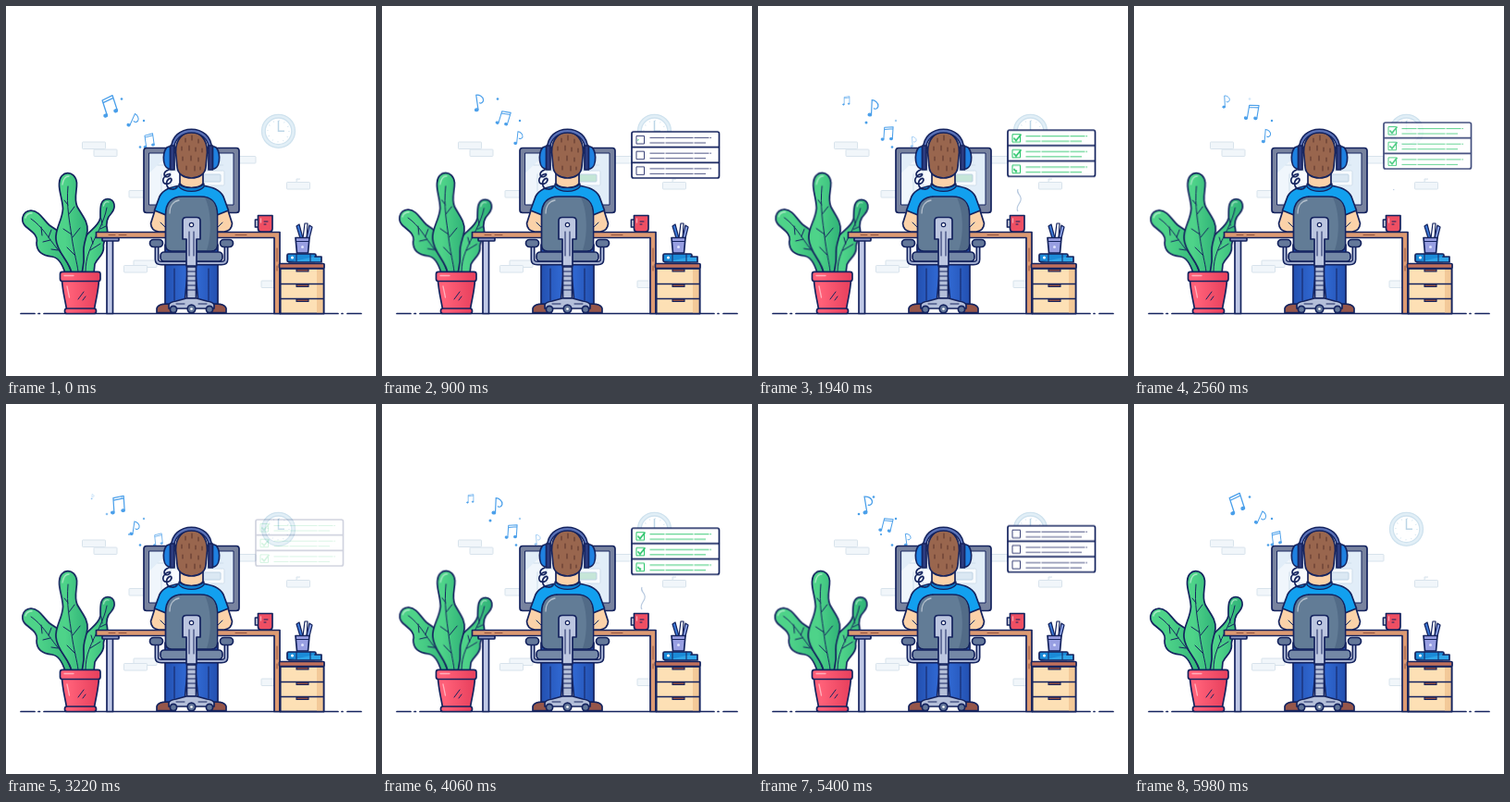
These frames come from a looping animation (400x400 px, 6 s). An HTML page:

```html
<!DOCTYPE html>
<html lang="en">
<head>
<meta charset="utf-8">
<title>Working at the desk</title>
<style>
  html, body { margin: 0; width: 100%; height: 100%; overflow: hidden; background: #fff; }
  svg { display: block; width: 100vw; height: 100vh; }
  .ink { stroke: #14235e; stroke-width: 1.7; stroke-linejoin: round; stroke-linecap: round; }
  .thin { stroke-width: 1; }
  .line { fill: none; }
  .faint { fill: #f1f6fa; stroke: #d8e3ec; stroke-width: 1; }
  .shine { fill: none; stroke: #fff; stroke-opacity: .5; stroke-width: 1.3; stroke-linecap: round; }

  /* the scene runs forward for 3 s, then backward */
  #plant { transform-origin: 80px 288px; animation: sway 1.5s ease-in-out infinite alternate; }
  @keyframes sway { to { transform: rotate(1.7deg); } }

  #panel { animation: drift 3s infinite alternate, show 3s linear infinite alternate; }
  @keyframes drift {
    0% { transform: translateY(127px); animation-timing-function: ease-in-out; }
    45% { transform: translateY(138.6px); animation-timing-function: ease-in-out; }
    95%, 100% { transform: translateY(125px); }
  }
  @keyframes show {
    0%, 4% { opacity: 0; }
    17%, 83% { opacity: 1; }
    95%, 100% { opacity: 0; }
  }

  #steam { stroke-dasharray: 1 2; animation: steam 3s linear infinite alternate; }
  @keyframes steam {
    0%, 44% { stroke-dashoffset: 1; }
    58%, 70% { stroke-dashoffset: 0; }
    86%, 100% { stroke-dashoffset: -1; }
  }

  #button { fill: #dbe8f3; animation: press 3s linear infinite alternate; }
  @keyframes press {
    0%, 23%, 37%, 56%, 72%, 100% { fill: #dbe8f3; }
    30%, 47%, 64% { fill: #c4e6d6; }
  }
</style>
</head>
<body>
<svg viewBox="0 0 400 400">
  <defs>
    <linearGradient id="leaf">
      <stop offset=".3" stop-color="#4ed389"/><stop offset="1" stop-color="#2fb277"/>
    </linearGradient>
    <linearGradient id="clay">
      <stop offset=".2" stop-color="#ff6078"/><stop offset="1" stop-color="#e73f5c"/>
    </linearGradient>
    <linearGradient id="denim">
      <stop offset="0" stop-color="#2350b0"/><stop offset=".35" stop-color="#2f66cf"/>
      <stop offset=".65" stop-color="#2f66cf"/><stop offset="1" stop-color="#2350b0"/>
    </linearGradient>
    <g id="brick"><rect class="faint" width="25" height="7.500" rx=".8"/></g>
    <g id="pair" fill="#4a9fea" stroke="#4a9fea" stroke-width="1.200" stroke-linejoin="round">
      <path class="line" d="M-4 7V-8L7 -9.500V5.500M-4 -5.500L7 -7"/>
      <ellipse cx="-5.500" cy="7.300" rx="1.700" ry="1.300"/>
      <ellipse cx="5.500" cy="5.800" rx="1.700" ry="1.300"/>
    </g>
    <g id="single" fill="#4a9fea" stroke="#4a9fea" stroke-width="1.200" stroke-linecap="round">
      <path class="line" d="M-1 6.500V-9C2 -9 6.500 -6.500 6 -2.500C5.500 0 3 1 1.500 0"/>
      <ellipse cx="-2.700" cy="7" rx="1.800" ry="1.400"/>
    </g>
    <g id="row">
      <path class="box line" d="M5 4.500h8.500v8.500h-8.500z" stroke-width="1"/>
      <path class="rules line" d="M19.500 6.500H86M19.500 12H80" stroke-width=".9" stroke-dasharray="16 1 30 1"/>
      <path class="tick line" d="M6.500 8.500L9 11.300L14.500 4.500" stroke="#27c468" stroke-width="1.700" pathLength="1" stroke-dasharray="1 2"/>
    </g>
  </defs>

  <!-- wall -->
  <use href="#brick" x="82.500" y="147"/><use href="#brick" x="95" y="155"/>
  <use href="#brick" x="133" y="199.500"/><use href="#brick" x="138" y="275"/>
  <use href="#brick" x="127.500" y="280.500"/><use href="#brick" x="303.500" y="190.500"/>
  <use href="#brick" x="245" y="162.500"/><use href="#brick" x="276" y="297"/>
  <path class="faint" d="M314 190.500V187H318"/>
  <g fill="#fff" stroke="#cfe2ee">
    <circle cx="294.500" cy="135.300" r="18" fill="#e2eff7" stroke-width="1.300"/>
    <circle cx="294.500" cy="135.300" r="14.300" stroke-width="1.300"/>
    <circle cx="294.500" cy="135.300" r="11.500" fill="none" stroke-width="1.500" stroke-dasharray=".8 5.220"/>
    <path class="line" d="M294.500 124V135.300H301" stroke="#bcd5e6" stroke-width="1.500"/>
  </g>

  <g id="dots" fill="#4a9fe8"></g>
  <g id="notes"></g>

  <!-- floor -->
  <path class="ink line" d="M16 332.500H31M35 332.500H36.500M41 332.500H359M363 332.500H364M369 332.500H384"/>

  <!-- plant -->
  <g id="plant" class="ink" fill="url(#leaf)">
    <path d="M64 289C61 279 56 272 50 271C39 270 33 265 33 256C35 248 28 244 22 239C15 233 17 222 27 221C37 222 40 231 47 237C55 243 63 246 65 254C68 265 75 275 75 289Z"/>
    <path d="M80 289C80 276 78 263 84 252C89 243 100 239 102 229C102 219 101 209 110 208.500C118 209 119 218 114 224C108 230 108 236 109.500 242C111 250 104 254 105.500 261C106 269 99 272 96 279L95 289Z"/>
    <path d="M71 289C69 276 55 267 54 252C53 240 61 232 61.500 219C61 209 57 200 57.500 192C58 177 75 177 76.500 191C77 200 73 208 77 217C82 226 89 233 88 243C87 252 83 257 84 268C85 278 83 283 82 289Z"/>
    <g class="thin line">
      <path d="M27 230C39 238 46 251 55 262C63 271 68 280 70 287M38 239L39 248M48 253L40 255M56 264L49 263M46 250L49 242"/>
      <path d="M67 195C65 217 69 234 71 249C73 265 77 278 78 287M67 215L63 210M68 225L74 217M71 247L62 241M72 250L80 240M75 270L66 261"/>
      <path d="M109 218C106 235 96 249 90 265C87 273 86 280 86 287M104 237L103 230M102 241L108 238M94 257L92 250M91 264L102 257"/>
    </g>
    <path class="shine" d="M61 193C62 186 65 184 68 184M21 229C22 225 25 224 28 224M105.500 216C106 212 109 211 111 212"/>
  </g>
  <g class="ink" fill="url(#clay)">
    <path d="M60.500 296H100.500C100 308 97 318 95.500 328H65.500C64 318 61 308 60.500 296Z"/>
    <rect x="58.500" y="287.300" width="43.500" height="10.200" rx="2.500"/>
    <rect x="63.500" y="327" width="34" height="5.500" rx="2.500"/>
    <path class="thin line" d="M78 317L84 309M83 318L86 314"/>
    <path class="shine" d="M63 291.500H73M66 303L68.500 315"/>
  </g>

  <!-- monitor -->
  <g class="ink">
    <rect x="149" y="153.500" width="103" height="70" rx="3" fill="#78839f"/>
    <rect class="thin" x="155" y="159" width="91" height="56" fill="#e1edf8"/>
    <path d="M155.500 214V180L177 159.500H214L159 214Z" fill="#f0f6fc" stroke="none"/>
    <path class="line" d="M164 172H235M168 182V205" stroke="#cfdeeb" stroke-width="1"/>
    <rect x="178" y="178" width="58" height="16" rx="1.500" fill="#f8fbfe" stroke="#cfdeeb" stroke-width="1"/>
    <rect id="button" x="190" y="182" width="42" height="8" rx="1" stroke="#bad0e1" stroke-width=".9"/>
  </g>

  <!-- desk frame -->
  <g class="ink">
    <rect x="109" y="252" width="6.500" height="80.500" fill="#c0c9e6"/>
    <rect x="104" y="250.500" width="18" height="3.500" rx="1" fill="#8d99c4"/>
    <path d="M97.500 244.500H296V332.500H290V250.500H97.500Z" fill="#dd9a72"/>
    <path class="line" d="M111 247.500H118M122 247.500H130M248 247.500H260M293 262V276M293 281V286" stroke="#8f4f3c" stroke-width="1"/>
  </g>

  <!-- drawers, books, pens -->
  <g class="ink">
    <rect x="296.500" y="279" width="47" height="53.500" fill="#fde0b5"/>
    <path d="M336 284H343V332H336Z" fill="#f3c998" stroke="none"/>
    <path class="line" d="M296.500 284H343.500V332.500H296.500ZM297 300.500H343M297 316.500H343"/>
    <rect x="295.500" y="278.500" width="48.500" height="5" rx="1" fill="#c0705c"/>
    <path d="M314 284.500H327V287H314ZM314 301H327V303.500H314ZM314 317H327V319.500H314Z" fill="#8c4c43" stroke-width="1.100"/>
    <rect x="304" y="268" width="31" height="8.500" rx="1.500" fill="#1b8bd8"/>
    <path d="M334 271H341V277H306" fill="#2fa5e8"/>
    <path class="line thin" d="M314 268V276M329 268V276"/>
    <circle cx="309.500" cy="272" r="1.500" fill="#fff" stroke="none"/>
    <path d="M318 251L314 238L317 236L321 251" fill="#3b79d8" stroke-width="1.200"/>
    <path d="M321 251L323 235L326 235L325 251" fill="#fff" stroke-width="1.200"/>
    <path d="M325 251L328 237L331 239L328 251" fill="#8ca3e8" stroke-width="1.200"/>
    <path d="M313 250.500H328L326.500 267H314.500Z" fill="#989fe2"/>
    <path class="line thin" d="M313.500 254.500H327.500"/>
    <circle cx="320.500" cy="260.500" r="1.500" fill="#dfe3ff" stroke="none"/>
  </g>

  <!-- mug -->
  <path id="steam" class="line" d="M281 222C277 216 286 213 284 207C283 203 279 202 281 198" stroke="#b7c9df" stroke-width="1.200" pathLength="1"/>
  <g class="ink">
    <path class="line" d="M273 231H269.500V239H273"/>
    <path d="M272.500 226.500H288V240.500Q288 244 285 244H275.500Q272.500 244 272.500 240.500Z" fill="#ef4f63"/>
    <path class="thin line" d="M279 233H283M279 236H281"/>
    <path class="shine" d="M275.500 230V234"/>
  </g>

  <!-- legs and shoes -->
  <g class="ink">
    <path d="M163 331.500V327C164 322 173 321 183 323V331.500ZM238 331.500V327C237 322 228 321 218 323V331.500Z" fill="#96564a"/>
    <path d="M172 258H229V322H208L204 280H197L193 322H172Z" fill="url(#denim)"/>
    <path class="line thin" d="M182 284V318M219 284V318"/>
  </g>

  <!-- torso and arms -->
  <g class="ink">
    <path d="M161 221L156.500 235Q157 243 165 244H176V221ZM240 221L244.500 235Q244 243 236 244H225V221Z" fill="#fbd2a9"/>
    <path class="line thin" d="M167 234L172 239M234 234L229 239"/>
    <path d="M188 194C178 196 170 198 166 206L160.500 221L173 226V244H228V226L240.500 221L235 206C231 198 223 196 213 194Z" fill="#12a0ef"/>
    <path class="line thin" d="M173 226L176 215M228 226L225 215"/>
    <path d="M188 176H213V192C209 198 192 198 188 192Z" fill="#fbd2a9"/>
    <path d="M187 192C192 198 209 198 214 192V195.500C208 202 193 202 187 195.500Z" fill="#0d7fd0" stroke-width="1.200"/>
  </g>

  <!-- head and headphones -->
  <g class="ink">
    <path class="line" d="M176 177C168 180 171 187 176 184C181 181 173 180 170 187C168 194 178 194 179 188C179 184 172 188 174 194C175 199 183 199 185 196"/>
    <path d="M183.500 158C183 129 218 129 217.500 158L216 174C215 190 186 190 185 174Z" fill="#99664e"/>
    <path class="line" stroke="#5f382f" stroke-width="1.100" d="M194 143V147M201 140V145M208 144V148M190 152V156M198 151V156M205 153V157M212 154V158M191 163V167M200 162V167M208 164V168M195 173V177M204 173V178M210 174V177"/>
    <path d="M178.500 155C178 126 223 126 222.500 155H219.500C218.500 131 182.500 131 181.500 155Z" fill="#5a72b8" stroke-width="1.500"/>
    <path d="M180 152H176C169 153 168 174 176 176H180ZM221 152H225C232 153 233 174 225 176H221Z" fill="#1f80e0"/>
    <path d="M177.500 151H182V177H177.500ZM219 151H223.500V177H219Z" fill="#2d3d80"/>
  </g>

  <!-- chair -->
  <g class="ink">
    <path class="line" d="M163 260V274Q163 278 168 278H233Q238 278 238 274V260" stroke-width="5"/>
    <path class="line" d="M163 260V274Q163 278 168 278H233Q238 278 238 274V260" stroke="#a3afd0" stroke-width="2"/>
    <rect x="155.500" y="252.500" width="14" height="8" rx="4" fill="#64789a"/>
    <rect x="231.500" y="252.500" width="14" height="8" rx="4" fill="#64789a"/>
    <path d="M172.500 226C172.500 211 180 206 191 206H210C221 206 228.500 211 228.500 226V258Q228.500 265 222 265H179Q172.500 265 172.500 258Z" fill="#627c96"/>
    <path d="M215 207C224 209 227.500 214 227.500 226V258Q227 264 222 264H217C222 250 223 224 215 207Z" fill="#526b87" stroke="none"/>
    <path class="shine" d="M177 224C177 216 181 211 187 210" stroke-opacity=".35"/>
    <rect x="167" y="266" width="67" height="10" rx="4" fill="#7488a6"/>
    <path d="M191 232Q191 228.500 195 228.500H206Q210 228.500 210 232V252H206V281H195V252H191Z" fill="#bcc6e0"/>
    <circle cx="200.500" cy="236.500" r="2.200" fill="#fff" stroke-width="1.200"/>
    <path class="line thin" d="M198 244V270M203 244V270"/>
    <path d="M195.500 282H205.500V316H195.500Z" fill="#b4bfd9"/>
    <path class="thin line" d="M195.500 287H205.500M195.500 292H205.500M195.500 297H205.500M195.500 302H205.500M195.500 307H205.500"/>
    <path d="M176 327V323Q177 320 184 319L195 316H206L217 319Q224 320 225 323V327Z" fill="#b4bfd9"/>
    <path class="line thin" d="M184 322H193M208 322H217"/>
    <g fill="#64789a">
      <circle cx="181" cy="328" r="3.600"/><circle cx="200.500" cy="327.500" r="4.300"/><circle cx="220" cy="328" r="3.600"/>
    </g>
    <circle cx="200.500" cy="327.500" r="1.300" fill="#fff" stroke="none"/>
  </g>

  <!-- task list -->
  <g id="panel">
    <rect class="ink" x="270" width="94.500" height="50" rx="2" fill="#fff"/>
    <path class="ink line" d="M270.500 16.700H364M270.500 33.400H364"/>
    <g id="rows"></g>
  </g>
</svg>
<script>
const HALF = 3000, GAP = 750, FIRST = 400;
const $ = id => document.getElementById(id);
const clamp = v => Math.max(0, Math.min(1, v));

function add(parent, tag, attrs = {}) {
  const el = document.createElementNS('http://www.w3.org/2000/svg', tag);
  for (const k in attrs) el.setAttribute(k, attrs[k]);
  return parent.appendChild(el);
}

// age, x, y, scale, rotation of a drifting note
const PATH = [
  [0, 169, 147, .6, -4], [130, 164, 147, .7, -6], [350, 154, 146, .8, -8],
  [500, 147, 143, .8, 6], [800, 139.5, 138, .85, 4], [1100, 137, 124, .86, 24],
  [1250, 131, 121.5, .87, 17], [1550, 123.5, 110.5, 1, 2], [1850, 111, 109, 1.1, -18],
  [2000, 104, 105, 1, -8], [2300, 95, 102.5, .5, 0], [2450, 92, 98, .12, 0]
];

// Smooth curve through the points of PATH
function pose(age) {
  const i = PATH.findIndex(p => p[0] > age) - 1;
  const at = k => PATH[Math.max(0, Math.min(PATH.length - 1, k))];
  const [a, b, c, d] = [at(i - 1), at(i), at(i + 1), at(i + 2)];
  const span = c[0] - b[0], u = (age - b[0]) / span;
  const slope = (p, q, k) => (q[k] - p[k]) / (q[0] - p[0]) * span;
  return [1, 2, 3, 4].map(k => {
    const m = slope(a, c, k), n = slope(b, d, k), e = c[k] - b[k];
    return b[k] + u * (m + u * (3 * e - 2 * m - n + u * (m + n - 2 * e)));
  });
}

const notes = [0, 1, 2, 3].map(k => add($('notes'), 'use', { href: k % 2 ? '#pair' : '#single' }));

// x, y, radius, centre and half width of visibility within one gap
const DOTS = [
  [125, 100.5, 1.3, 40, 290], [149, 124, 1.2, 100, 380], [145, 152.5, 1.3, 600, 250],
  [117, 126, 1.5, 420, 100], [109, 119, 1.3, 590, 110], [133, 141, 1.1, 580, 110]
].map(([cx, cy, r, mid, width]) => ({ el: add($('dots'), 'circle', { cx, cy, r }), mid, width }));

const rows = [880, 1360, 1840].map((start, i) => {
  const el = $('row').cloneNode(true);
  el.removeAttribute('id');
  el.setAttribute('transform', `translate(270 ${i * 16.7})`);
  $('rows').append(el);
  return { start, box: el.querySelector('.box'), rules: el.querySelector('.rules'), tick: el.querySelector('.tick') };
});

const mix = p => `rgb(${[[58, 39], [66, 196], [120, 104]].map(([a, b]) => Math.round(a + (b - a) * p))})`;

function draw(t) {
  notes.forEach((el, k) => {
    const age = (t - FIRST - GAP * k + 2 * HALF) % HALF;
    const live = age < 2450;
    el.style.display = live ? '' : 'none';
    if (!live) return;
    const [x, y, s, r] = pose(age);
    el.setAttribute('transform', `translate(${x} ${y}) rotate(${r}) scale(${s})`);
    el.style.opacity = Math.min(clamp(.5 + age / 400), clamp((2550 - age) / 250));
  });
  for (const { el, mid, width } of DOTS) {
    const d = Math.abs((t % GAP - mid + 1.5 * GAP) % GAP - GAP / 2);
    el.style.opacity = clamp((width - d) / 80);
  }
  for (const { start, box, rules, tick } of rows) {
    const green = mix(clamp((t - start - 30) / 70));
    box.style.stroke = green;
    rules.style.stroke = green;
    tick.style.strokeDashoffset = 1 - clamp((t - start) / 240);
  }
}

let origin;
function frame(now) {
  origin ??= now;
  const t = (now - origin) % (2 * HALF);
  draw(t < HALF ? t : 2 * HALF - t);
  requestAnimationFrame(frame);
}
draw(0);
requestAnimationFrame(frame);
</script>
</body>
</html>
```
